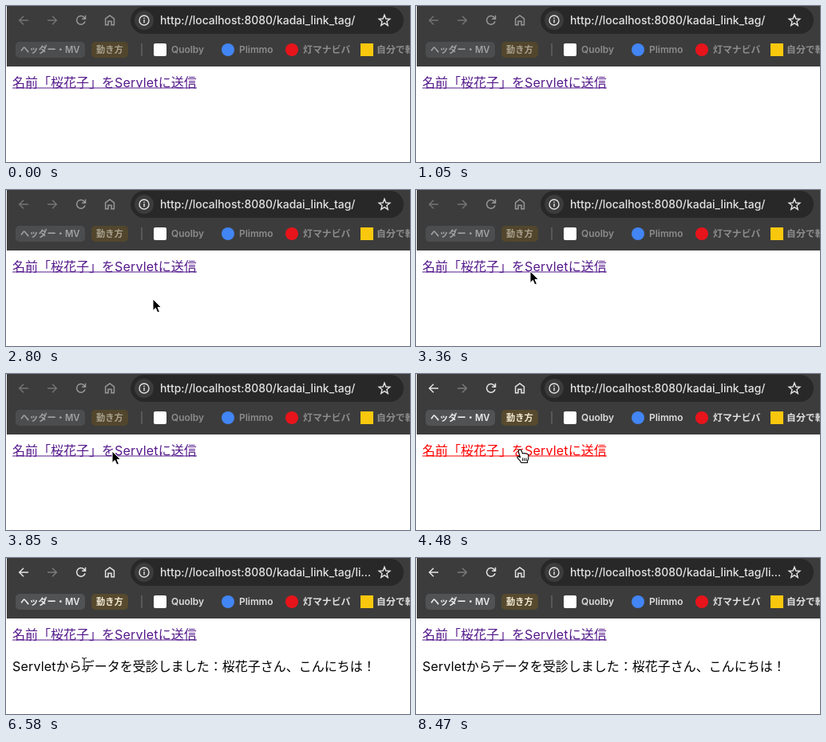
An HTML page that plays this animation: 506 by 196 pixels, repeating every 8680 ms.

```html
<!DOCTYPE html>
<html lang="ja">
<head>
<meta charset="utf-8">
<style>
  html, body { margin: 0; width: 100%; height: 100%; overflow: hidden; background: #fff; }
  svg { display: block; }
  text { white-space: pre; }
  #toolbar {
    --icon: #979797; --back: #747474; --forward: #747474; --label: #8c8c8c;
    --chip: #4c4d4e; --gold: #52462d; --chipText: #a2a2a2; --goldText: #aaa28f;
  }
  #toolbar.active {
    --icon: #e3e3e3; --back: #e3e3e3; --forward: #7b7b7b; --label: #dedede;
    --chip: #515253; --gold: #574a2e; --chipText: #eee; --goldText: #f3ead5;
  }
  .icon { fill: none; stroke: var(--icon); stroke-width: 1.5; }
  .url { font: 500 13.9px Inter, sans-serif; fill: #e3e3e3; }
  .bookmark { font: 600 11.9px Inter, "Noto Sans CJK JP", sans-serif; fill: var(--label); }
  .chip { font: 600 11.2px Inter, "Noto Sans CJK JP", sans-serif; }
  .page { font: 16px "Noto Sans CJK JP", "Noto Sans CJK", sans-serif; }
  .latin { font-family: Inter, sans-serif; letter-spacing: .2px; }
</style>
</head>
<body>
<svg width="506" height="196" viewBox="0 0 506 196">
  <g id="toolbar">
    <rect x="1" width="505" height="76" fill="#3c3c3c"/>
    <rect x="156" y="1" width="342" height="34" rx="17" fill="#282828"/>

    <path class="icon" style="stroke:var(--back)" d="M28 18H17M22 12.7L16.7 18L22 23.3"/>
    <path class="icon" style="stroke:var(--forward)" d="M52 18H63M58 12.7L63.3 18L58 23.3"/>
    <path class="icon" d="M99 19.2A5.3 5.3 0 1 1 97.6 14.1L99.3 15.8M99.5 11.8V16.2H95.1"/>
    <path class="icon" d="M124.6 23.8V16L130 12L135.4 16V23.8H132V19.3H128V23.8Z"/>

    <circle cx="173" cy="18" r="12" fill="#3c3c3c"/>
    <circle cx="173" cy="18" r="6" fill="none" stroke="#e3e3e3" stroke-width="1.4"/>
    <path d="M173 17V21.3M173 14.5V15.9" stroke="#e3e3e3" stroke-width="1.4"/>
    <text id="url" class="url" x="193" y="23"></text>
    <path id="star" fill="none" stroke="#e3e3e3" stroke-width="1.4"/>

    <rect x="12" y="45" width="87" height="20" rx="5" fill="var(--chip)"/>
    <text class="chip" x="18" y="59" fill="var(--chipText)">ヘッダー・MV</text>
    <rect x="107" y="45" width="46" height="20" rx="5" fill="var(--gold)"/>
    <text class="chip" x="113" y="59" fill="var(--goldText)">動き方</text>
    <path d="M170 47V63" stroke="#626262" stroke-width="1.5"/>

    <rect x="185" y="47" width="16" height="16" rx="2" fill="#fff"/>
    <text class="bookmark" x="207" y="59">Quolby</text>
    <circle cx="278" cy="55" r="8" fill="#4285f4"/>
    <text class="bookmark" x="292" y="59">Plimmo</text>
    <circle cx="358" cy="55" r="8" fill="#e8141c"/>
    <text class="bookmark" x="372" y="59">灯マナビバ</text>
    <rect x="444" y="47" width="16" height="16" fill="#f9c80e"/>
    <text class="bookmark" x="464" y="59">自分で転</text>
  </g>

  <g id="link" class="page">
    <text x="8" y="102">名前「桜花子」を<tspan class="latin">Servlet</tspan>に送信</text>
    <rect x="8" y="102.5" width="231" height="1"/>
  </g>
  <text id="reply" class="page" x="8" y="142"><tspan class="latin">Servlet</tspan>からデータを受診しました：桜花子さん、こんにちは！</text>

  <!-- Cursor shapes have their hot spot at the local origin -->
  <g id="cursor" stroke-linejoin="round">
    <path id="arrow" d="M0 0V14.5L3.4 11.4L5.8 17L8.4 15.9L6 10.4H10.4Z" fill="#000" stroke="#fff"/>
    <g id="hand">
      <path d="M-1 .5Q1-1 2 1.3L3.6 5L5.4 4.5L7.2 5L8.8 5.3Q10.8 5.5 10.8 8V11.5L9.5 14.5V16.5H1.8L-.2 13.3L-3 10.3Q-3.6 8.5-1.6 8.5L.6 9.8L-1.8 2.5Q-2 1-1 .5Z"
            fill="#fff" stroke="#000" stroke-width="1.1"/>
      <path d="M3.6 10.5V14.3M5.8 10.5V14.3M8 10.5V14.3" stroke="#000"/>
    </g>
    <g id="beam" fill="none">
      <path d="M-3-7.5Q0-7.5 0-5.5Q0-7.5 3-7.5M0-5.5V5.5M-3 7.5Q0 7.5 0 5.5Q0 7.5 3 7.5M-2 3H2" stroke="#fff" stroke-width="3"/>
      <path d="M-3-7.5Q0-7.5 0-5.5Q0-7.5 3-7.5M0-5.5V5.5M-3 7.5Q0 7.5 0 5.5Q0 7.5 3 7.5M-2 3H2" stroke="#222" stroke-width="1.2"/>
    </g>
  </g>
</svg>
<script>
const LOOP = 8680, STEP = 70;
const ACTIVATE = 4200, PRESS = 4480, LOADED = 4690;
const BASE_URL = 'http://localhost:8080/kadai_link_tag/';

// Pointer path: time, x, y
const path = [
  [2100, 322, 204], [2520, 222, 151], [2940, 165, 130], [3360, 143, 102],
  [3640, 136, 98], [3780, 134, 97], [4060, 130, 95], [6300, 130, 95],
  [6440, 116, 114], [6580, 98, 133], [6860, 64, 200]
];

const el = id => document.getElementById(id);
const show = (id, visible) => el(id).setAttribute('visibility', visible ? 'visible' : 'hidden');

const starPoints = Array.from({ length: 10 }, (_, i) => {
  const radius = i % 2 ? 3.1 : 7.2, angle = (i / 5 - .5) * Math.PI;
  return [474 + radius * Math.cos(angle), 18.5 + radius * Math.sin(angle)];
});
el('star').setAttribute('d', `M${starPoints.join('L')}Z`);

function pointerAt(t) {
  const next = path.findIndex(point => point[0] > t);
  if (next < 1) return null;
  const [t0, x0, y0] = path[next - 1], [t1, x1, y1] = path[next];
  const k = (t - t0) / (t1 - t0);
  return [x0 + (x1 - x0) * k, y0 + (y1 - y0) * k].map(Math.round);
}

function cursorShape(t, y) {
  if (t < ACTIVATE) return 'arrow';
  if (y < 106) return 'hand';
  return y > 124 && y < 148 ? 'beam' : 'arrow';
}

function draw(now) {
  const t = Math.floor(now % LOOP / STEP) * STEP;
  const loaded = t >= LOADED;
  el('toolbar').classList.toggle('active', t >= ACTIVATE);
  el('url').textContent = BASE_URL + (loaded ? 'li…' : '');
  el('link').setAttribute('fill', t >= PRESS && !loaded ? '#f00' : '#551a8b');
  show('reply', loaded);

  const pointer = pointerAt(t);
  const shape = pointer && cursorShape(t, pointer[1]);
  for (const id of ['arrow', 'hand', 'beam']) show(id, id === shape);
  if (pointer) el('cursor').setAttribute('transform', `translate(${pointer})`);
  requestAnimationFrame(draw);
}
draw(performance.now());
</script>
</body>
</html>
```
